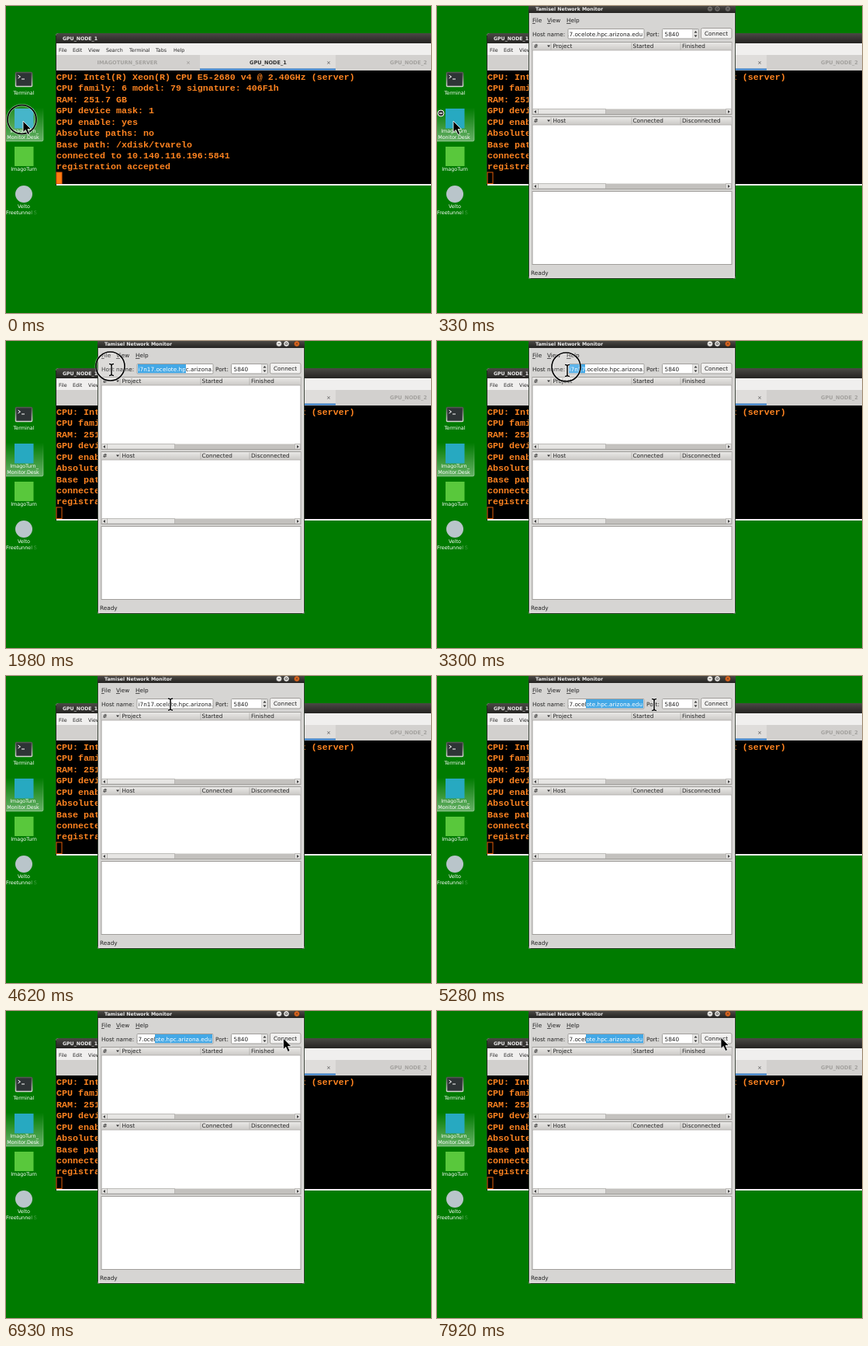
Recreate the animation shown at these times as an HTML page. Size 548x395 px, loop 8 s.

```html
<!DOCTYPE html>
<html lang="en">
<head>
<meta charset="utf-8">
<title>Network monitor session</title>
<style>
html, body { margin: 0; width: 100%; height: 100%; overflow: hidden; background: #007b00; }
svg { display: block; width: 548px; height: 395px; }
text { font: 7.3px "DejaVu Sans", sans-serif; fill: #222; }
.small text { font-size: 6.3px; }
.tabs text { font: bold 6.6px "DejaVu Sans", sans-serif; fill: #a3a19e; text-anchor: middle; }
text.title { font: bold 6.2px "DejaVu Sans", sans-serif; fill: #eee; }
.labels text { font-size: 6.4px; fill: #fff; text-anchor: middle; }
#output text { font: bold 11.66px "Liberation Mono", monospace; fill: #ff8420; white-space: pre; }
.field { fill: #fff; stroke: #a09e9b; }
.u { text-decoration: underline; }
</style>
</head>
<body>
<svg viewBox="0 0 548 395">
  <defs>
    <linearGradient id="dark" x2="0" y2="1"><stop stop-color="#4b4945"/><stop offset="1" stop-color="#242321"/></linearGradient>
    <linearGradient id="header" x2="0" y2="1"><stop stop-color="#e9e8e6"/><stop offset="1" stop-color="#cbc9c6"/></linearGradient>
    <linearGradient id="fade"><stop offset=".7" stop-color="#fff"/><stop offset="1" stop-color="#fff" stop-opacity=".1"/></linearGradient>
    <linearGradient id="glow" x2="0" y2="1"><stop stop-color="#fff" stop-opacity="0"/><stop offset="1" stop-color="#fff" stop-opacity=".4"/></linearGradient>
    <linearGradient id="metal" x2="0" y2="1"><stop stop-color="#555753"/><stop offset="1" stop-color="#d3d7cf"/></linearGradient>
    <clipPath id="hostClip"><rect x="169.5" y="30" width="97" height="11.5"/></clipPath>
    <clipPath id="selClip"><rect id="selClipRect" y="30" height="11.5"/></clipPath>
  </defs>
  <rect width="548" height="395" fill="#007b00"/>

  <g class="labels">
    <rect x="-2" y="130.500" width="50" height="43.500" rx="2" fill="url(#glow)" stroke="url(#glow)"/>
    <rect x="12.500" y="85.500" width="21" height="18" rx="1" fill="#2e3436" stroke="url(#metal)" stroke-width="1.500"/>
    <path d="M15.500 89l3 2-3 2M20 94h4" fill="none" stroke="#fff"/>
    <text x="23" y="114">Terminal</text>
    <rect x="11" y="132" width="24.500" height="25.500" fill="#27a9c1"/>
    <text x="23.500" y="163">ImagoTurn_</text>
    <text x="22" y="170.500">Monitor.Desk</text>
    <rect x="11" y="181" width="24.500" height="25" fill="#59c83c"/>
    <text x="23" y="212">ImagoTurn</text>
    <circle cx="23" cy="242" r="11" fill="#b9c5ca"/>
    <text x="23" y="260">Velto</text>
    <text x="0" y="267.500" style="text-anchor:start;fill:url(#fade)">Freetunnel S</text>
    <g id="emblem"><circle cx="5" cy="138" r="4" fill="#333" stroke="#fff"/><path d="M3 138h4" stroke="#fff" stroke-width="1.300"/></g>
  </g>

  <g>
    <path d="M64 231V39q0-4 4-4H548V231z" fill="#f0efee"/>
    <path d="M64 48V39q0-4 4-4H548V48z" fill="url(#dark)"/>
    <text class="title" x="73" y="44">GPU_NODE_1</text>
    <g class="small" id="termMenu"></g>
    <path d="M64.500 63H548V83H64.500z" fill="#d2d0ce"/>
    <path d="M250 63H425V83H250z" fill="#dfdddb"/>
    <path d="M250 81.500H425" stroke="#2a76c6" stroke-width="2"/>
    <g class="tabs">
      <text x="156.500" y="75">IMAGOTURN_SERVER</text><text x="235" y="75">×</text>
      <text x="338" y="75" style="fill:#333">GPU_NODE_1</text><text x="416" y="75" style="fill:#777">×</text>
      <text x="519" y="75">GPU_NODE_2</text>
    </g>
    <path d="M65 83H548V229H65z"/>
    <path d="M64.500 231V38" stroke="#1c2a1a"/>
    <g id="output"></g>
    <rect id="block" x="65" y="214" width="7" height="14.500" stroke="#e05c08"/>
  </g>

  <g id="monitor">
    <path d="M118 0H385V349q0 2-2 2H120q-2 0-2-2z" fill="#d6d5d3"/>
    <path d="M118.500 0V348.500q0 2 2 2H382.500q2 0 2-2V0" fill="none" stroke="#3c443a"/>
    <path d="M119.500 9V349.500H383.500V9" fill="none" stroke="#eceae8"/>
    <path d="M118 0H385V9H118z" fill="url(#dark)"/>
    <text class="title" x="127" y="6.300">Tamisel Network Monitor</text>
    <g id="buttons" stroke="#222" stroke-width=".6">
      <circle cx="352" cy="3.500" r="3.700"/><circle cx="361.500" cy="3.500" r="3.700"/><circle cx="375" cy="3.500" r="3.700"/>
      <path d="M350.500 3.500h3M360.200 2.500h2.600v2h-2.600zM373.700 2.200l2.600 2.600m0-2.600l-2.600 2.600" fill="none"/>
    </g>
    <text x="123" y="21"><tspan class="u">F</tspan>ile</text>
    <text x="142" y="21"><tspan class="u">V</tspan>iew</text>
    <text x="167" y="21"><tspan class="u">H</tspan>elp</text>
    <text x="123" y="38.500">Host name:</text>
    <rect class="field" x="169" y="29.500" width="98" height="12.500" rx="1"/>
    <g clip-path="url(#hostClip)">
      <text class="host" y="38.500">i7n17.ocelote.hpc.arizona.edu</text>
      <g clip-path="url(#selClip)">
        <rect x="169" y="29" width="98" height="14" fill="#43a8e6"/>
        <text class="host" y="38.500" style="fill:#fff">i7n17.ocelote.hpc.arizona.edu</text>
      </g>
    </g>
    <text x="270" y="38.500">Port:</text>
    <rect class="field" x="290.500" y="29.500" width="47" height="12.500" rx="1"/>
    <path d="M329.500 30V42H337V30z" fill="#e6e5e3" stroke="#bbb" stroke-width=".5"/>
    <path d="M331.500 34.500l2-2.500 2 2.500zM331.500 37.500l2 2.500 2-2.500z" fill="#333"/>
    <text x="293.500" y="38.500">5840</text>
    <rect x="340.500" y="28.500" width="39.500" height="13.500" rx="2" fill="#f1f0ef" stroke="#a09e9b"/>
    <text x="345" y="38.300">Connect</text>
    <g id="lists"></g>
    <rect class="field" x="123" y="238.500" width="257" height="94"/>
    <text x="121" y="345.500">Ready</text>
  </g>

  <g id="ring">
    <circle r="18.500" fill="#fff" fill-opacity=".14" stroke="#fff" stroke-opacity=".5" stroke-width="3"/>
    <circle r="18.500" fill="none" stroke="#000" stroke-width="1.600"/>
  </g>
  <path id="arrow" d="M0 0V14.500L3.300 11.400 6 17.500 8.600 16.300 6 10.500H10.500z" stroke="#fff" stroke-width=".8"/>
  <g id="beam" fill="none">
    <path d="M-3-7.500Q0-7.500 0-5.500Q0-7.500 3-7.500M0-5.500V5.500M-3 7.500Q0 7.500 0 5.500Q0 7.500 3 7.500" stroke="#fff" stroke-width="2.800"/>
    <path d="M-3-7.500Q0-7.500 0-5.500Q0-7.500 3-7.500M0-5.500V5.500M-3 7.500Q0 7.500 0 5.500Q0 7.500 3 7.500" stroke="#000" stroke-width="1.500"/>
  </g>
</svg>
<script>
const LOOP = 8000, STEP = 330;
const $ = id => document.getElementById(id);
const label = (x, y, s) => `<text x="${x}" y="${y}">${s}</text>`;
const show = (id, on) => $(id).setAttribute('visibility', on ? 'visible' : 'hidden');
const place = (id, x, y) => $(id).setAttribute('transform', `translate(${x} ${y})`);

const menu = { File: 68, Edit: 86, View: 106, Search: 129, Terminal: 159, Tabs: 193, Help: 216 };
$('termMenu').innerHTML = Object.entries(menu).map(([s, x]) => label(x, 59, s)).join('');

$('output').innerHTML = [
  'CPU: Intel(R) Xeon(R) CPU E5-2680 v4 @ 2.40GHz (server)',
  'CPU family: 6 model: 79 signature: 406F1h',
  'RAM: 251.7 GB',
  'GPU device mask: 1',
  'CPU enable: yes',
  'Absolute paths: no',
  'Base path: /xdisk/tvarelo',
  'connected to 10.140.116.196:5841',
  'registration accepted'
].map((s, i) => label(65, 94.8 + i * 14.45, s)).join('');

// A list with column headings and a horizontal scroll bar.
function list(y, columns) {
  const dividers = [147, 251, 314].map(x => `M${x} ${y + 1}v9`).join('');
  return `<rect class="field" x="123" y="${y}" width="257" height="93"/>
    <rect x="123.500" y="${y + .5}" width="256" height="10" fill="url(#header)"/>
    <path d="${dividers}M123 ${y + 10.5}h257" stroke="#aaa8a5" stroke-width=".7"/>
    <path d="M142 ${y + 4}h4l-2 2.500z" fill="#333"/>
    <rect x="123.500" y="${y + 86}" width="256" height="6.500" fill="#c3c1be"/>
    <rect x="130.500" y="${y + 86}" width="87" height="6.500" fill="#e6e5e3" stroke="#a5a3a0" stroke-width=".6"/>
    <path d="M123.500 ${y + 86}h7v6.500h-7zM372.500 ${y + 86}h7v6.500h-7z" fill="#e6e5e3" stroke="#a5a3a0" stroke-width=".6"/>
    <path d="M128 ${y + 87.5}v4l-3-2zM375 ${y + 87.5}v4l3-2z" fill="#444"/>`
    + ['#', ...columns].map((s, i) => label([124.5, 149.5, 252.5, 316][i], y + 7.3, s)).join('');
}
$('lists').innerHTML = list(46.5, ['Project', 'Started', 'Finished'])
  + list(142.5, ['Host', 'Connected', 'Disconnected']);

// Pointer path: step, x, y
const path = [
  [0, 22, 148], [1, 21, 148], [2, 60, 120], [3, 140, 70], [4, 208, 40], [5, 215, 37],
  [6, 136, 37], [8, 191, 38], [9, 191, 38], [10, 168, 38], [11, 168, 38], [13, 212, 36.5],
  [14, 212, 36.5], [16, 280, 37], [18, 349, 36], [24, 366, 34]
];
function pointer(step) {
  const i = Math.max(1, path.findIndex(p => p[0] >= step));
  const [s0, x0, y0] = path[i - 1], [s1, x1, y1] = path[i];
  const k = (step - s0) / (s1 - s0);
  return [x0 + (x1 - x0) * k, y0 + (y1 - y0) * k];
}

function selection(step, x) {
  if (step >= 16) return [192, 266];
  if (step === 15) return [208, x];
  if (step >= 10 && step < 13) return [170, 191];
  if (step >= 6 && step < 9) return [170, 232];
  return [0, 0];
}

function draw(now) {
  const step = Math.floor(now % LOOP / STEP);
  const [x, y] = pointer(step);
  const isBeam = step >= 4 && step <= 16;
  const [from, to] = selection(step, x);

  show('monitor', step > 0);
  show('emblem', step === 1);
  $('block').setAttribute('fill', step ? 'none' : '#ff7a10');
  const [plain, close] = step < 2 ? ['#6e6c69', '#6e6c69'] : ['#eceae6', '#e2691f'];
  [...$('buttons').children].slice(0, 3).forEach((c, i) => c.setAttribute('fill', i < 2 ? plain : close));

  const hostX = step < 6 || step >= 16 ? 154.5 : 170.5;
  document.querySelectorAll('.host').forEach(t => t.setAttribute('x', hostX));
  $('selClipRect').setAttribute('x', from);
  $('selClipRect').setAttribute('width', to - from);

  show('ring', [0, 5, 6, 9, 10, 15].includes(step));
  place('ring', x - 1.5, y - (isBeam ? 4.5 : 2));
  show('arrow', !isBeam);
  show('beam', isBeam);
  place(isBeam ? 'beam' : 'arrow', x, y);
  requestAnimationFrame(() => draw(performance.now()));
}
draw(0);
</script>
</body>
</html>
```
